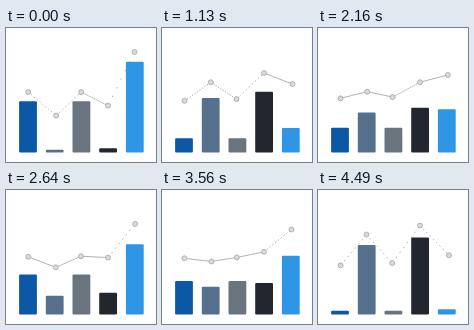
These frames come from a looping animation (150x134 px, 4590 ms). An HTML page:

```html
<!DOCTYPE html>
<html lang="en">
<head>
<meta charset="utf-8">
<title>Bars and line</title>
<style>
  html, body { margin: 0; width: 100%; height: 100%; overflow: hidden; background: #fff; }
  svg { display: block; width: 100%; height: 100%; }
  line { stroke: #777; stroke-width: .6; }
  circle { fill: #dadada; stroke: #9c9c9c; stroke-width: .7; }
</style>
</head>
<body>
<svg viewBox="0 0 150 134"><g id="bars"></g><g id="links"></g><g id="dots"></g></svg>
<script>
const LOOP = 4590, LAST = 4490, FLOOR = 124.5;
const DELAY = 15, RISE = 1455, FALL = 1545;

// Each pair is the value at the start and at the end of a swing.
const columns = [
  { color: '#0b58a5', top: [72.8, 121.5], x: [22.2, 22.6], y: [64, 75.5] },
  { color: '#56718e', top: [122.3, 54], x: [50.2, 48.4], y: [88, 44] },
  { color: '#6a747e', top: [72.8, 121.5], x: [75.2, 74.2], y: [64, 73.2] },
  { color: '#22272f', top: [120.8, 46.5], x: [102, 102], y: [78, 35] },
  { color: '#2f96e5', top: [33, 120.5], x: [128.5, 131], y: [23.7, 65.8] }
];

function set(node, attrs) {
  for (const key in attrs) node.setAttribute(key, attrs[key]);
}

function add(parentId, tag, attrs = {}) {
  const node = document.createElementNS('http://www.w3.org/2000/svg', tag);
  set(node, attrs);
  return document.getElementById(parentId).appendChild(node);
}

columns.forEach((c, i) => {
  c.bar = add('bars', 'rect', { x: 13.1 + 26.7 * i, width: 17.8, rx: 1, fill: c.color });
  c.dot = add('dots', 'circle', { r: 2.5 });
  if (i) c.link = add('links', 'line');
});

function swing(time) {
  const period = RISE + FALL;
  const t = (time - DELAY + period) % period;
  return t < RISE ? t / RISE : (period - t) / FALL;
}

// Flat links are solid; steeper ones break up into ever sparser dashes.
function drawLink(link, [x1, y1], [x2, y2]) {
  const slope = Math.abs((y2 - y1) / (x2 - x1));
  const gap = Math.max(0, slope - 0.4) * 5;
  set(link, { x1, y1, x2, y2, 'stroke-dasharray': `1.5 ${gap}` });
}

function draw(now) {
  const p = swing(Math.min(now % LOOP, LAST));
  const mix = ([a, b]) => a + (b - a) * p;
  let previous;

  for (const c of columns) {
    const top = mix(c.top), cx = mix(c.x), cy = mix(c.y);
    set(c.bar, { y: top, height: FLOOR - top });
    set(c.dot, { cx, cy });
    if (c.link) drawLink(c.link, previous, [cx, cy]);
    previous = [cx, cy];
  }
}

const start = performance.now();
function tick() {
  draw(performance.now() - start);
  requestAnimationFrame(tick);
}
tick();
</script>
</body>
</html>
```
